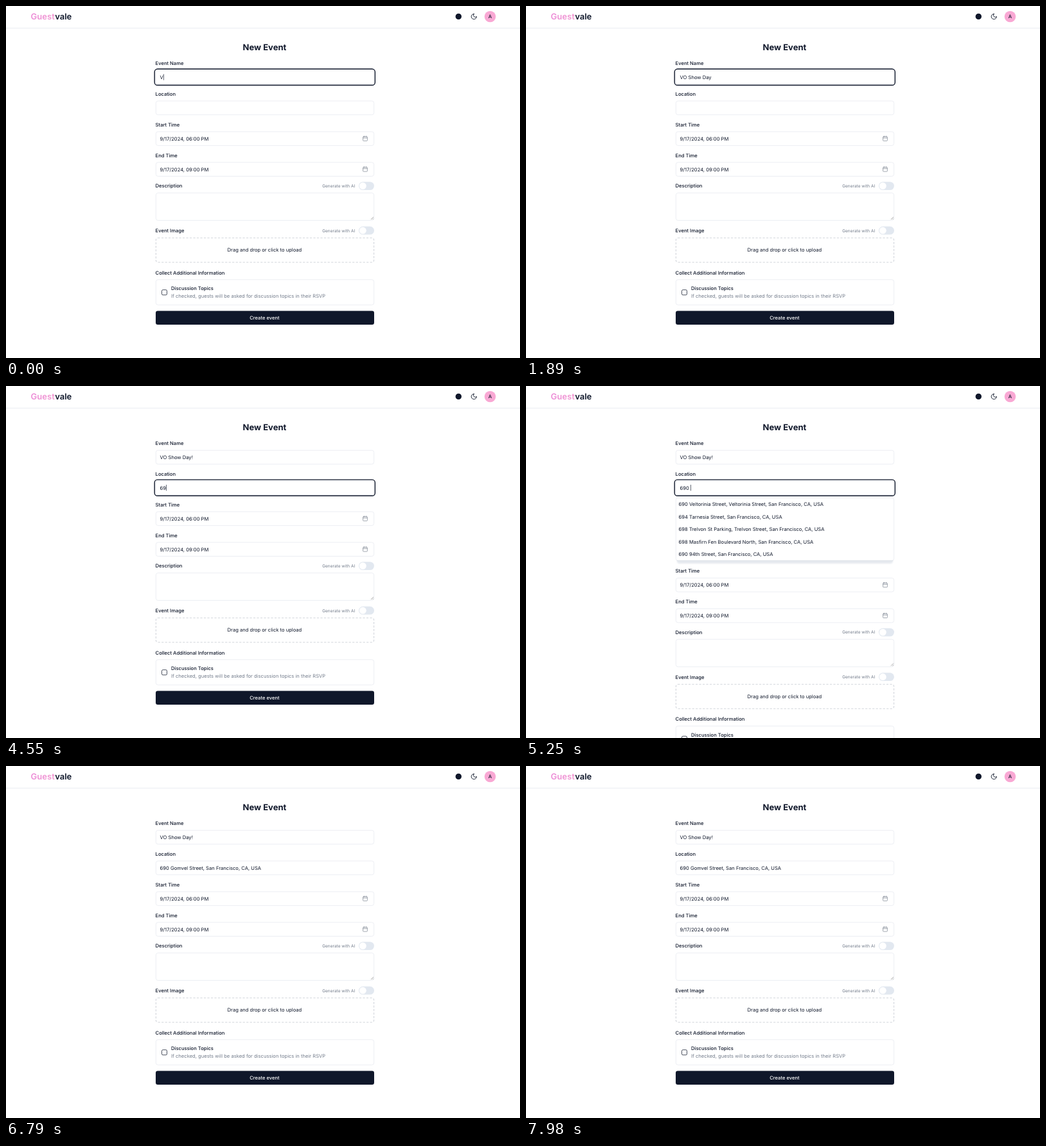
Write an HTML page that moves like this. It is 800x549 px and loops after 8 s.

```html
<!DOCTYPE html>
<html lang="en">
<head>
<meta charset="utf-8">
<title>New Event</title>
<style>
  html, body { margin: 0; width: 100%; height: 100%; overflow: hidden; background: #fff; }
  svg { display: block; width: 100vw; height: 100vh; }
  text {
    font-family: Inter, sans-serif; font-size: 7.62px; fill: #0f172a;
    white-space: pre; text-rendering: geometricPrecision;
  }
  .label { font-weight: 500; }
  .title { font-size: 13.06px; font-weight: 700; }
  .logo { font-size: 13.06px; font-weight: 600; }
  .small { font-size: 6.53px; }
  .muted { fill: #747d8c; }
  .mid { text-anchor: middle; }
  .box { fill: #fff; stroke: #eaedf2; stroke-width: .9; }
  .icon { fill: none; stroke-width: 2; stroke-linecap: round; stroke-linejoin: round; }
</style>
</head>
<body>
<svg id="stage" viewBox="0 0 800 549">
  <defs>
    <linearGradient id="pink">
      <stop offset="0" stop-color="#ec8cd8"/>
      <stop offset="1" stop-color="#f6a0cb"/>
    </linearGradient>
    <filter id="soft" x="-5%" y="-50%" width="110%" height="200%">
      <feGaussianBlur stdDeviation=".9"/>
    </filter>
  </defs>
</svg>
<script>
const LOOP = 8000, LEFT = 233, WIDTH = 340, SHIFT = 103.5;
const INK = '#0f172a';
const stage = document.getElementById('stage');

function add(parent, tag, attrs, content = '') {
  const node = document.createElementNS('http://www.w3.org/2000/svg', tag);
  for (const key in attrs) node.setAttribute(key, attrs[key]);
  node.textContent = content;
  parent.appendChild(node);
  return node;
}
const text = (parent, x, y, content, cls = '') => add(parent, 'text', { x, y, class: cls }, content);
const box = (parent, y, height) =>
  add(parent, 'rect', { class: 'box', x: LEFT + .3, y, width: WIDTH - .6, height, rx: 3.3 });
const show = (node, on) => node.setAttribute('visibility', on ? 'visible' : 'hidden');

function field(parent, y, label, value = '') {
  text(parent, LEFT - .4, y, label, 'label');
  box(parent, y + 8.1, 21.6);
  return text(parent, 239.6, y + 21.7, value);
}

function calendar(parent, y) {
  const icon = add(parent, 'g', {
    class: 'icon', stroke: '#858c98', transform: `translate(554.5 ${y}) scale(.375)`
  });
  add(icon, 'rect', { x: 3, y: 4, width: 18, height: 18, rx: 2 });
  add(icon, 'path', { d: 'M16 2v4M8 2v4M3 10h18' });
}

function toggle(parent, y) {
  text(parent, 492.2, y + 2.3, 'Generate with AI', 'small muted');
  add(parent, 'rect', { x: 549, y: y - 6.4, width: 24, height: 12.8, rx: 6.4, fill: '#e2e8f0' });
  add(parent, 'circle', { cx: 555.4, cy: y, r: 5.4, fill: '#fff' });
}

function buildHeader() {
  const logo = text(stage, 38.6, 21, '', 'logo');
  add(logo, 'tspan', { fill: 'url(#pink)' }, 'Guest');
  add(logo, 'tspan', {}, 'vale');
  add(stage, 'circle', { cx: 704.3, cy: 16.4, r: 4.7, fill: INK });
  const moon = add(stage, 'g', {
    class: 'icon', stroke: INK, transform: 'translate(722.8 10.9) scale(.46)'
  });
  add(moon, 'path', { d: 'M12 3a6 6 0 0 0 9 9 9 9 0 1 1-9-9Z' });
  add(stage, 'circle', { cx: 753.5, cy: 16.5, r: 8.8, fill: '#f9a8d4' });
  text(stage, 753.5, 19.2, 'A', 'label mid');
  add(stage, 'path', { d: 'M0 34.5H800', stroke: '#eaedf2' });
  text(stage, 402.4, 69.4, 'New Event', 'title mid');
}

function buildLower() {
  const lower = add(stage, 'g', {});
  field(lower, 187.9, 'Start Time', '9/17/2024, 06:00 PM');
  calendar(lower, 202.1);
  field(lower, 235.8, 'End Time', '9/17/2024, 09:00 PM');
  calendar(lower, 249.9);

  text(lower, LEFT - .4, 283.4, 'Description', 'label');
  toggle(lower, 280.6);
  box(lower, 291.6, 42.8);
  add(lower, 'path', { d: 'M568 333l4-4M570.4 333l1.6-1.6', stroke: '#777', 'stroke-width': .6 });

  text(lower, LEFT - .4, 353, 'Event Image', 'label');
  toggle(lower, 350.2);
  add(lower, 'rect', {
    x: 233.4, y: 361.8, width: 339.2, height: 37.9, rx: 3, fill: '#fff',
    stroke: '#d2d6dc', 'stroke-width': 1.1, 'stroke-dasharray': '3.3 2.2'
  });
  text(lower, 402.4, 383.4, 'Drag and drop or click to upload', 'mid');

  text(lower, LEFT - .4, 418.8, 'Collect Additional Information', 'label');
  box(lower, 426.8, 39.4);
  add(lower, 'rect', {
    x: 242.5, y: 442.7, width: 8, height: 8, rx: 1.8, fill: '#fff', stroke: INK, 'stroke-width': .75
  });
  text(lower, 257, 443.3, 'Discussion Topics', 'label');
  text(lower, 257, 454.5, 'If checked, guests will be asked for discussion topics in their RSVP', 'muted');
  add(lower, 'rect', { x: LEFT, y: 475.4, width: WIDTH, height: 21.6, rx: 3.3, fill: INK });
  text(lower, 402.4, 489.1, 'Create event', 'label mid').style.fill = '#fff';
  return lower;
}

function buildList() {
  const list = add(stage, 'g', {});
  add(list, 'rect', {
    x: 235, y: 255, width: 336, height: 22, rx: 4, fill: '#e6eaef', filter: 'url(#soft)'
  });
  box(list, 174.3, 98.2);
  add(list, 'path', { d: 'M235 272.4H571', stroke: '#d9dee5', 'stroke-width': .8 });
  list.rows = [0, 1, 2, 3, 4].map(i => text(list, 237.6, 186.9 + i * 19.6, ''));
  return list;
}

const BROAD = [
  '690 Veltorinia Street, Veltorinia Street, San Francisco, CA, USA',
  '694 Tarnesia Street, San Francisco, CA, USA',
  '698 Trelvon St Parking, Trelvon Street, San Francisco, CA, USA',
  '698 Masfirn Fen Boulevard North, San Francisco, CA, USA',
  '690 94th Street, San Francisco, CA, USA'
];
const NARROW = [
  '690 Gomvel Street, San Francisco, CA, USA',
  '690 Gomvel Avenue, Burlingame, CA, USA',
  '690 Gomvel Avenue, Somerset, NJ, USA',
  '690 Gomvel Drive, Sparks, NV, USA',
  '690 Gomb Avenue, Sacramento, CA, USA'
];

// Each step changes only the parts it names.
const steps = [
  [0, { name: 'V', place: '', focus: 'name', caret: true, list: null }],
  [70, { name: 'VO' }],
  [210, { name: 'VO ' }],
  [350, { name: 'VO S' }],
  [490, { name: 'VO Sh' }],
  [700, { name: 'VO Sho' }],
  [840, { name: 'VO Show' }],
  [980, { name: 'VO Show ' }],
  [1120, { name: 'VO Show D' }],
  [1330, { name: 'VO Show Da' }],
  [1400, { name: 'VO Show Day' }],
  [1890, { caret: false }],
  [2450, { caret: true }],
  [2520, { name: 'VO Show Day!' }],
  [2940, { focus: 'place' }],
  [3500, { caret: false }],
  [3990, { caret: true }],
  [4130, { place: '6' }],
  [4550, { place: '69' }],
  [4690, { place: '690' }],
  [4830, { list: BROAD }],
  [5250, { place: '690 ' }],
  [5390, { place: '690 g' }],
  [5530, { place: '690 go' }],
  [5600, { place: '690 gom' }],
  [5740, { list: NARROW }],
  [6160, { caret: false }],
  [6650, { place: NARROW[0], focus: null, list: null }]
];

buildHeader();
const lower = buildLower();
const inputs = {
  name: field(stage, 92.2, 'Event Name'),
  place: field(stage, 140, 'Location')
};
const list = buildList();
const ring = add(stage, 'rect', {
  x: 231.2, width: 343.2, height: 25.2, rx: 4.6, fill: 'none', stroke: INK, 'stroke-width': 1.4
});
const caret = add(stage, 'rect', { width: .65, height: 9.4, fill: INK });
const ringTop = { name: 98.3, place: 146.1 };

function draw(state) {
  inputs.name.textContent = state.name;
  inputs.place.textContent = state.place;
  lower.setAttribute('transform', `translate(0 ${state.list ? SHIFT : 0})`);
  show(list, state.list);
  if (state.list) list.rows.forEach((row, i) => row.textContent = state.list[i]);
  show(ring, state.focus);
  show(caret, state.focus && state.caret);
  if (state.focus) {
    const top = ringTop[state.focus];
    const typed = state[state.focus] ? inputs[state.focus].getComputedTextLength() : 0;
    ring.setAttribute('y', top);
    caret.setAttribute('y', top + 7.9);
    caret.setAttribute('x', 239.7 + typed);
  }
}

const start = performance.now();
let shown = -1;
function tick() {
  const time = Math.max(0, performance.now() - start) % LOOP;
  const count = steps.filter(([at]) => at <= time).length;
  if (count !== shown) {
    shown = count;
    draw(Object.assign({}, ...steps.slice(0, count).map(step => step[1])));
  }
  requestAnimationFrame(tick);
}
tick();
</script>
</body>
</html>
```
